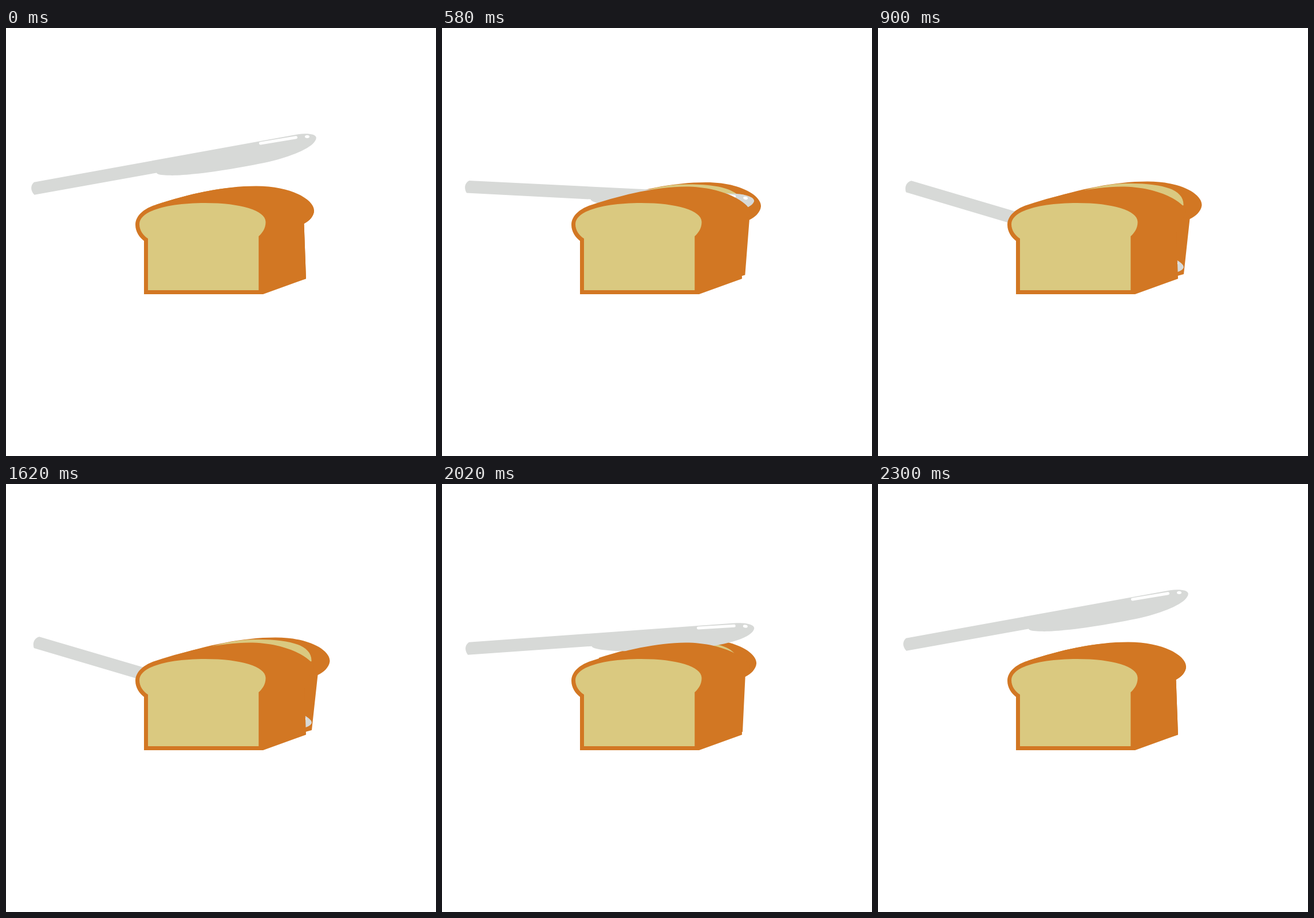
Write an HTML page that moves like this. It is 751x746 px and loops after 2.52 s.

```html
<!DOCTYPE html>
<html lang="en">
<head>
<meta charset="utf-8">
<title>Slicing bread</title>
<style>
  html, body { margin: 0; width: 100%; height: 100%; overflow: hidden; background: #fff; }
  svg { display: block; width: 100%; height: 100%; }
  .crust { fill: #d27723; }
  .crumb { fill: #dac980; }
  .steel { fill: #d7d9d7; }
  #knife { transform-origin: 292.5px 237px; }
  #slice { transform-origin: 524px 437px; }
</style>
</head>
<body>
<svg viewBox="0 0 751 746">
  <g id="slice">
    <path class="crust" d="M300 450H480L524 437L520.5 341C530 336 538 328 538 318C538 300 500 275.5 437 275.5C380 275.5 320 289 262 308Z"/>
    <path class="crumb" d="M305 299C335 288 365 279.5 400 279C460 278 503 288 506 317L470 330H305Z"/>
  </g>
  <g id="knife">
    <path class="steel" d="M49 268.7L510 185.3C524 183 541 184 541.8 191C541.5 206 505 222 460 233C400 246 320 258 285 256.8C272 256.5 264 255.5 263 252.5L49.5 290.7C43 284 42 275 49 268.7Z"/>
    <path d="M444.5 201L506.5 190.7" stroke="#fff" stroke-width="5" stroke-linecap="round"/>
    <ellipse cx="526" cy="189.3" rx="4" ry="2.6" fill="#fff"/>
  </g>
  <path class="crust" d="M241 464H449L524 437L520.5 341C530 336 538 328 538 318C533 303 490 276.5 425 276.5C375 277 320 289 262 308C245 313 226 325 226 343C226 355 233 365 241 371Z"/>
  <path class="crumb" d="M248 457V367C240 362 233 353 233 342C233 318 285 305 348 305C410 305 453.5 318 453.5 338C453.5 349 448 357 441.3 363V457Z"/>
</svg>
<script>
  const LOOP = 2520;
  const MIRROR = 2500; // the return runs the same path backwards
  const knife = document.getElementById("knife");
  const slice = document.getElementById("slice");

  const ramp = (t, from, to) => Math.min(1, Math.max(0, (t - from) / (to - from)));
  const easeOut = p => Math.sin(p * Math.PI / 2);
  const move = (el, x, y, turn) => {
    el.style.transform = `translate(${x}px, ${y}px) ${turn}`;
  };

  function draw(now) {
    const time = now % LOOP;
    const t = Math.min(time, MIRROR - time);
    const lower = ramp(t, 200, 480);
    const part = ramp(t, 360, 480);
    const cut = ramp(t, 480, 690);
    const settle = easeOut(ramp(t, 690, 900));

    move(knife,
      -1.3 * cut - 1.1 * settle,
      33.5 * lower + 40.9 * cut + 35.9 * settle,
      `rotate(${6.18 * lower + 14.3 * cut + 6.2 * settle}deg)`);
    move(slice,
      part + 9 * cut,
      -5 * part - 3 * cut,
      `skewX(${-4.9 * part - 3.4 * cut}deg)`);
  }

  const start = performance.now();
  function tick() {
    draw(performance.now() - start);
    requestAnimationFrame(tick);
  }
  tick();
</script>
</body>
</html>
```
